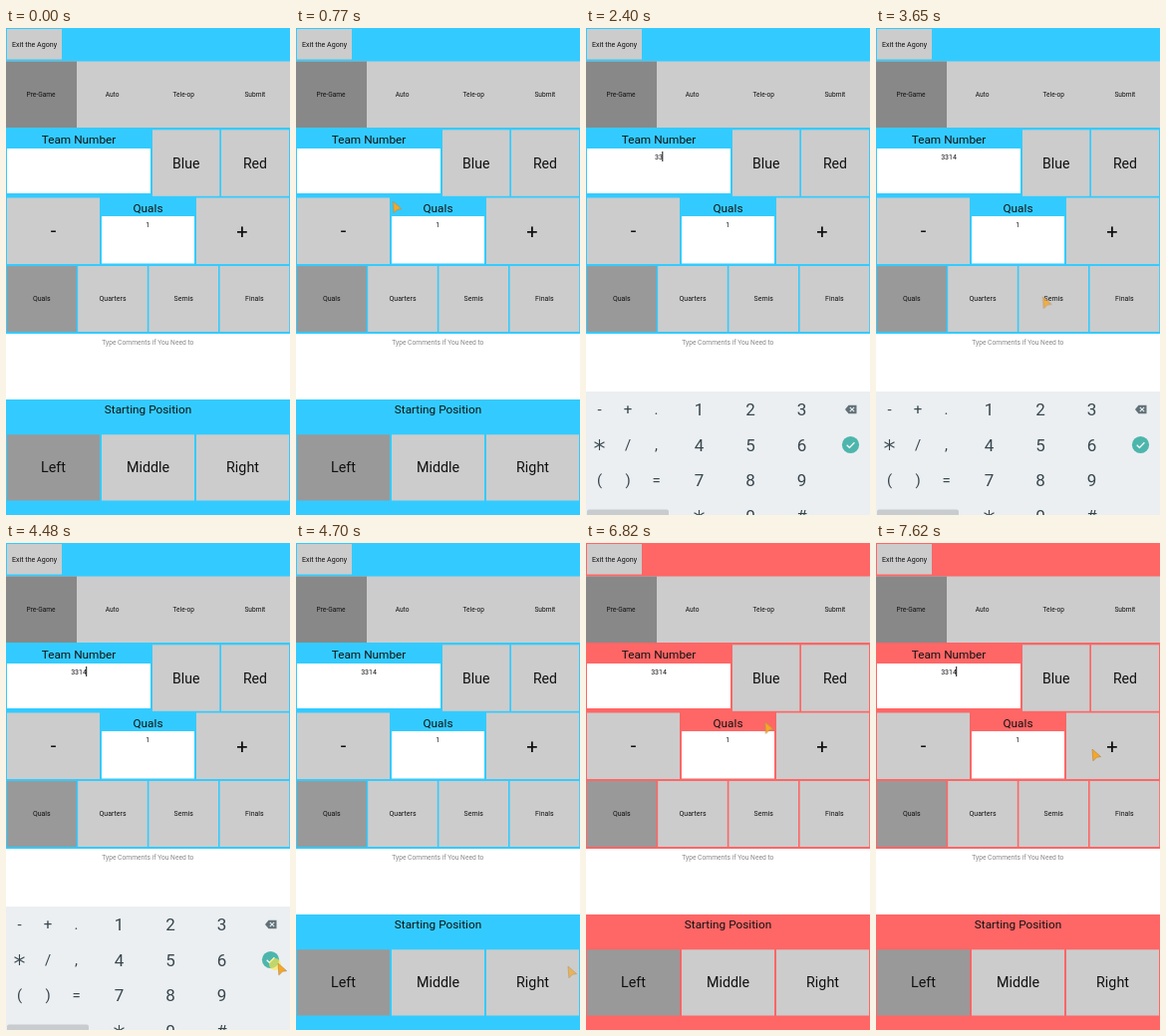
Write an HTML page that moves like this. It is 285 px wide and 489 px high and loops after 8 s.

```html
<!DOCTYPE html>
<html lang="en">
<head>
<meta charset="utf-8">
<title>Match form</title>
<style>
html, body { margin: 0; width: 100%; height: 100%; overflow: hidden; background: #3cf; }
svg { display: block; }
#stage { width: 100vw; height: 100vh; }
text { font-family: Roboto, sans-serif; text-anchor: middle; fill: #111; }

#page, #strip, #caret, #keyboard, #tap, #cursor { animation: 8s step-end infinite; }

#page { animation-name: alliance; }
@keyframes alliance {
  0% { fill: #33cbff; }
  77.625%, 100% { fill: #ff6666; }
}

#strip { animation-name: typing; }
@keyframes typing {
  0% { transform: translateY(0); }
  27.75% { transform: translateY(-20px); }
  30% { transform: translateY(-40px); }
  33.375% { transform: translateY(-60px); }
  37%, 100% { transform: translateY(-80px); }
}

#caret { animation-name: caret-step, blink; }
@keyframes caret-step {
  0% { transform: translateX(72px); }
  27.75% { transform: translateX(74.3px); }
  30% { transform: translateX(76.3px); }
  33.375% { transform: translateX(78.3px); }
  37%, 100% { transform: translateX(80.2px); }
}
@keyframes blink {
  0%, 17.5%, 43.25%, 57%, 70.75%, 84.5% { opacity: 0; }
  10.625% { opacity: .4; }
  23.125%, 50.125%, 63.875%, 77.625%, 91.375%, 100% { opacity: 1; }
}

#keyboard { animation-name: keyboard; animation-timing-function: linear; }
@keyframes keyboard {
  0%, 15.875% { transform: translateY(80px); opacity: 0; animation-timing-function: cubic-bezier(.2, .6, .5, 1); }
  17.875%, 56.5% { transform: none; opacity: 1; animation-timing-function: ease-in; }
  58.5%, 100% { transform: translateY(80px); opacity: 0; }
}

#tap { animation-name: tap; }
@keyframes tap {
  0%, 56.5%, 100% { opacity: 0; }
  53.25% { opacity: .65; }
}

#cursor { animation-name: glide, fade; animation-timing-function: linear; }
@keyframes glide {
  0%, 2% { transform: translate(261px, 482px); animation-timing-function: ease-in-out; }
  12%, 18.2% { transform: translate(76px, 134px); }
  18.3%, 43% { transform: translate(84px, 140px); }
  45.625% { transform: translate(167px, 269px); animation-timing-function: ease-out; }
  50.625% { transform: translate(272px, 436px); }
  53% { transform: translate(273px, 421px); }
  56% { transform: translate(273px, 422px); }
  58.75% { transform: translate(273px, 425px); animation-timing-function: ease-in-out; }
  63.25% { transform: translate(205px, 220px); animation-timing-function: ease-out; }
  67.75%, 70.625% { transform: translate(197px, 166px); animation-timing-function: ease-in-out; }
  77.25%, 79.5% { transform: translate(247px, 143px); animation-timing-function: ease-in-out; }
  86.5% { transform: translate(175px, 182px); }
  89.375% { transform: translate(186px, 209px); animation-timing-function: ease-out; }
  95.25%, 100% { transform: translate(217px, 207px); }
}
@keyframes fade {
  0%, 2% { opacity: 0; }
  3%, 17% { opacity: 1; }
  18.1%, 43% { opacity: 0; }
  45.625% { opacity: .8; }
  47%, 56.5% { opacity: 1; }
  58.75% { opacity: .7; }
  60%, 100% { opacity: 1; }
}
</style>
</head>
<body>
<svg id="stage" viewBox="0 0 285 489" preserveAspectRatio="none">
  <rect id="page" width="285" height="489"/>
  <g id="form"></g>

  <svg x="1" y="122" width="144" height="20" viewBox="1 122 144 20">
    <g id="strip"></g>
  </svg>
  <rect id="caret" y="124" width="1" height="10" fill="#111"/>

  <g id="keyboard">
    <rect y="365" width="285" height="210" fill="#eceff1"/>
    <rect x="1" y="483.5" width="82" height="24" rx="2" fill="#c8cccf"/>
    <g id="keys"></g>
    <path d="M260 383l3.5-4.3h8v8.6h-8z" fill="#607078"/>
    <path d="M264.8 380.8l4.4 4.4m0-4.4l-4.4 4.4" stroke="#eceff1" stroke-width="1.1"/>
    <circle cx="265.5" cy="418.5" r="8.6" fill="#4db6ac"/>
    <path d="M261.7 418.7l2.7 2.7 5-5.2" fill="none" stroke="#fff" stroke-width="1.3"/>
  </g>

  <circle id="tap" cx="270" cy="423" r="6" fill="#ffe84a"/>
  <path id="cursor" d="M0 0L8.6 7.6 4.4 8.2 .9 11.8z" fill="#f7a823" stroke="#b58a55" stroke-width=".7" stroke-linejoin="round"/>
</svg>

<script>
const $ = id => document.getElementById(id);
const box = (x, y, w, h, fill = '#ccc') =>
  `<rect x="${x}" y="${y}" width="${w}" height="${h}" fill="${fill}"/>`;
const label = (text, x, y, size, fill = '#111') =>
  `<text x="${x}" y="${y}" font-size="${size}" style="fill:${fill}">${text}</text>`;
const button = (text, x, y, w, h, size, fill) =>
  box(x, y, w, h, fill) + label(text, x + w / 2, y + h / 2 + size * .355, size);

const tabs = ['Pre-Game', 'Auto', 'Tele-op', 'Submit'];
const rounds = ['Quals', 'Quarters', 'Semis', 'Finals'];
const starts = ['Left', 'Middle', 'Right'];

$('form').innerHTML = [
  button('Exit the Agony', 1, 1, 55, 30.5, 7.1),
  box(0, 33.5, 285, 66.5),
  box(0, 33.5, 71, 66.5, '#888'),
  ...tabs.map((t, i) => label(t, 35 + i * 71.6, 68.5, 6.6)),
  label('Team Number', 73, 116, 11.8),
  box(1, 121, 144, 45, '#fff'),
  button('Blue', 147, 102.3, 67.3, 66.5, 14.1),
  button('Red', 216, 102.3, 68, 66.5, 14.1),
  box(1, 170.5, 93, 66.5),
  label('-', 47.5, 210, 20),
  label('Quals', 142.5, 184.5, 11.8),
  box(96, 189, 93, 47.5, '#fff'),
  label('1', 142.3, 200, 7),
  box(191, 170.5, 93, 66.5),
  label('+', 237, 211, 20),
  ...rounds.map((t, i) => button(t, 1 + i * 71.2, 239, 69.6, 66, 7, i ? '#ccc' : '#999')),
  box(0, 307, 285, 66, '#fff'),
  label('Type Comments if You Need to', 142.3, 318, 6.7, '#888'),
  label('Starting Position', 142.5, 387, 11.8),
  ...starts.map((t, i) => button(t, 1 + i * 95, 408.3, 93, 66.2, 14.3, i ? '#ccc' : '#999'))
].join('');

$('strip').innerHTML = [...'3314']
  .map((_, i) => label('3314'.slice(0, i + 1), 73, 152 + i * 20, 7)).join('');

const columns = [13.5, 42, 70.5, 113.5, 165, 216.5];
const rows = ['-+.123', '*/,456', '()=789', '  ' + ' *0#'];
const star = (x, y) =>
  `<path d="M${x} ${y - 5.5}v11M${x - 5} ${y - 2.8}l10 5.6m0-5.6l-10 5.6" stroke="#37474f" stroke-width="1.1"/>`;

$('keys').innerHTML = rows.map((row, r) => [...row].map((key, c) => {
  const x = columns[c], y = 383 + r * 35.5, size = c < 3 ? 15 : 17;
  if (key === ' ') return '';
  return key === '*' ? star(x, y) : label(key, x, y + size * .355, size, '#37474f');
}).join('')).join('');
</script>
</body>
</html>
```
